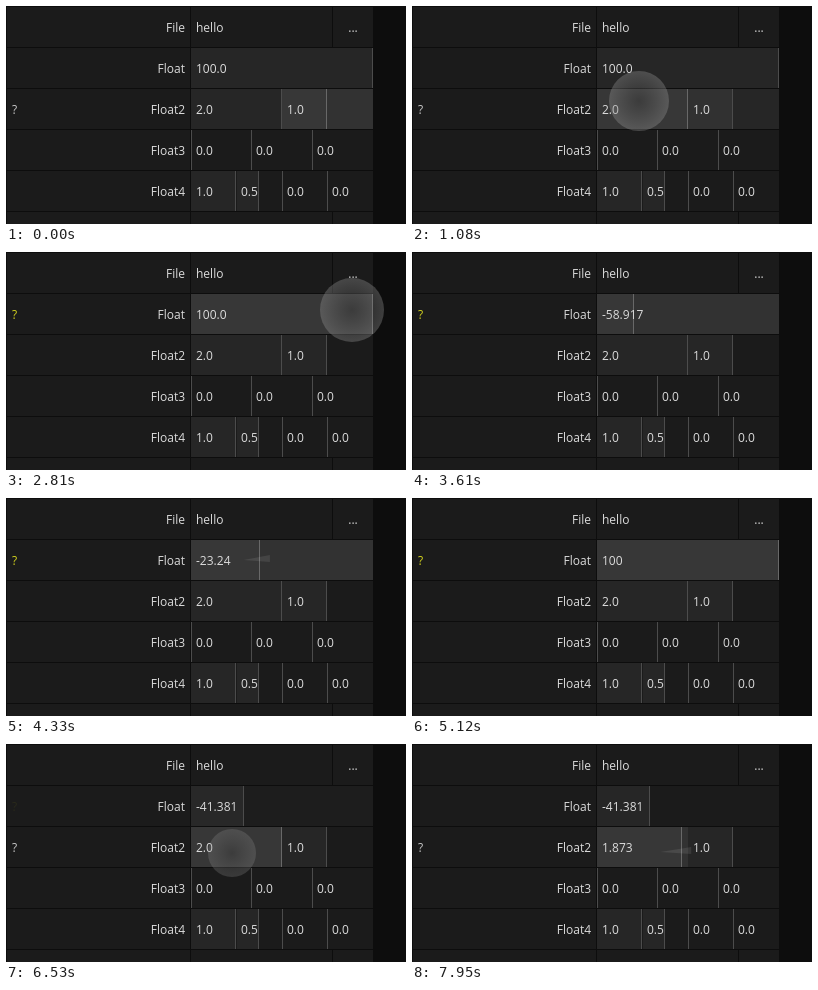
An HTML page with a canvas for the animation above (8000 ms loop, 400 by 218 pixels).

```html
<!DOCTYPE html>
<html>
<head>
<meta charset="utf-8">
<style>
html, body { margin: 0; width: 100%; height: 100%; overflow: hidden; background: #0d0d0d; }
canvas { display: block; }
</style>
</head>
<body>
<canvas id="stage" width="400" height="218"></canvas>
<script>
const ctx = document.getElementById('stage').getContext('2d');
const LOOP = 8000, STEP = 80, ROW = 41, LEFT = 185, WIDTH = 182;

// Hover changes: time, row, cell
const hovers = [[0, 2, 1], [1080, 2, 0], [1710, 1, 0], [6450, 2, 0]];
// Mouse clicks: time, x, y, radius
const clicks = [[1080, 227, 95, 30], [1710, 230, 69, 30], [2810, 346, 58, 32],
                [5660, 238, 98, 30], [6450, 226, 109, 30]];

const smooth = k => k * k * (3 - 2 * k);
const speedUp = k => k ** 1.5;

// Mouse drags: y, easing and [time, x] keys
const drags = [
  { y: 61, ease: smooth, keys: [[2810, 346], [3610, 222.3855], [4010, 183], [4490, 280], [5120, 382]] },
  { y: 107, ease: smooth, keys: [[7000, 226], [7480, 174]] },
  { y: 107, ease: speedUp, keys: [[7640, 182], [7950, 270.2215]] }
];

function tick(drag, t) {
  const start = drag.keys[0][0], end = drag.keys.at(-1)[0];
  if (t >= end) return end;
  return Math.max(start, start + Math.floor((t - start) / STEP) * STEP);
}

function mouseX({ keys, ease }, t) {
  let i = 1;
  while (i < keys.length - 1 && t > keys[i][0]) i++;
  const [t0, x0] = keys[i - 1], [t1, x1] = keys[i];
  return x0 + (x1 - x0) * ease((t - t0) / (t1 - t0));
}

function dragged(drag, t, width, min, max) {
  const k = (mouseX(drag, tick(drag, t)) - LEFT) / width;
  return String(+(min + (max - min) * Math.min(1, Math.max(0, k))).toFixed(3));
}

function floatValue(t) {
  if (t < 2890) return '100.0';
  return t < 5660 ? dragged(drags[0], t, WIDTH, -100, 100) : '-41.381';
}

function float2Value(t) {
  if (t < 7080) return '2.0';
  return dragged(drags[t < 7640 ? 1 : 2], t, WIDTH / 2, 0, 2);
}

function rect(color, x, y, w, h) {
  ctx.fillStyle = color;
  ctx.fillRect(x, y, w, h);
}

function text(str, x, y, align = 'left', color = '#dcdcdc') {
  ctx.textAlign = align;
  ctx.fillStyle = color;
  ctx.fillText(str, x, y);
}

function slider(row, cell, count, value, min, max, hover) {
  const y = row * ROW + 1, w = WIDTH / count, x = LEFT + cell * w;
  const left = Math.round(x), right = Math.round(x + w);
  const end = x + w * (value - min) / (max - min);
  const bar = Math.max(Math.floor(x), Math.floor(end) - 1);
  rect('#262626', left, y, Math.max(0, bar - left), 40);
  if (hover) {
    ctx.globalAlpha = hover;
    rect('#323232', left, y, right - left, 40);
    rect('#373737', left, y, Math.max(0, bar - left), 40);
    ctx.globalAlpha = 1;
  }
  rect(hover === 1 ? '#686868' : '#4c4c4c', bar, y, 1, 40);
  text(value, Math.floor(x) + 5, y + 25);
}

function drawClick(x, y, r, age) {
  if (age < 0 || age >= 2 * STEP) return;
  const late = age >= STEP;
  if (late) r *= 0.8;
  const g = ctx.createRadialGradient(x, y, 0, x, y, r);
  g.addColorStop(0, 'rgba(70,70,70,.3)');
  g.addColorStop(1, `rgba(150,150,150,${late ? 0.25 : 0.36})`);
  ctx.fillStyle = g;
  ctx.beginPath();
  ctx.arc(x, y, r, 0, 7);
  ctx.fill();
}

function drawTrail(drag, t) {
  const { keys, y } = drag, now = tick(drag, t);
  if (t < keys[0][0] + STEP) return;
  const x = mouseX(drag, now), old = mouseX(drag, tick(drag, now - 1));
  if (Math.abs(x - old) < 5) return;
  const tip = x + Math.sign(x - old) * 9;
  ctx.fillStyle = 'rgba(255,255,255,.09)';
  ctx.beginPath();
  ctx.moveTo(old + 6, y + 1);
  ctx.lineTo(tip, y - 4);
  ctx.lineTo(tip, y + 3);
  ctx.fill();
}

function draw(t) {
  rect('#0d0d0d', 0, 0, 400, 218);
  for (let row = 0; row < 6; row++) {
    const y = row * ROW + 1;
    rect('#1b1b1b', 1, y, 183, 40);
    rect('#1b1b1b', LEFT, y, WIDTH, 40);
    if (row % 5 === 0) rect('#0d0d0d', 326, y, 1, 40);
  }
  ctx.font = '12px "Open Sans", "Noto Sans", sans-serif';
  ['File', 'Float', 'Float2', 'Float3', 'Float4'].forEach((name, i) =>
    text(name, 179, i * ROW + 26, 'right'));
  text('hello', 190, 26);
  text('...', 347, 26, 'center');

  const now = hovers.findLastIndex(h => t >= h[0]);
  const age = t - hovers[now][0];
  const ghost = now === 0 ? 0 : age < STEP ? 0.5 : age < 2 * STEP ? 0.08 : 0;
  const is = (i, row, cell) => i >= 0 && hovers[i][1] === row && hovers[i][2] === cell;
  const hover = (row, cell) => is(now, row, cell) ? 1 : is(now - 1, row, cell) ? ghost : 0;
  const mark = (row, alpha) => {
    ctx.globalAlpha = alpha;
    text('?', 6, row * ROW + 26, 'left', row === 1 ? '#d2d21e' : '#c8c8c8');
    ctx.globalAlpha = 1;
  };
  const row = hovers[now][1];
  mark(row, 1);
  if (ghost && hovers[now - 1][1] !== row) mark(hovers[now - 1][1], ghost);

  slider(1, 0, 1, floatValue(t), -100, 100, hover(1, 0));
  slider(2, 0, 2, float2Value(t), 0, 2, hover(2, 0));
  slider(2, 1, 2, '1.0', 0, 2, hover(2, 1));
  for (let i = 0; i < 3; i++) slider(3, i, 3, '0.0', 0, 1, 0);
  ['1.0', '0.5', '0.0', '0.0'].forEach((v, i) => slider(4, i, 4, v, 0, 1, 0));

  if (t < 5660) drawTrail(drags[0], t);
  else drawTrail(drags[t < 7640 ? 1 : 2], t);
  for (const [start, x, y, r] of clicks) drawClick(x, y, r, t - start);
}

const begin = performance.now();
function frame() {
  draw((performance.now() - begin) % LOOP);
  requestAnimationFrame(frame);
}
frame();
</script>
</body>
</html>
```
